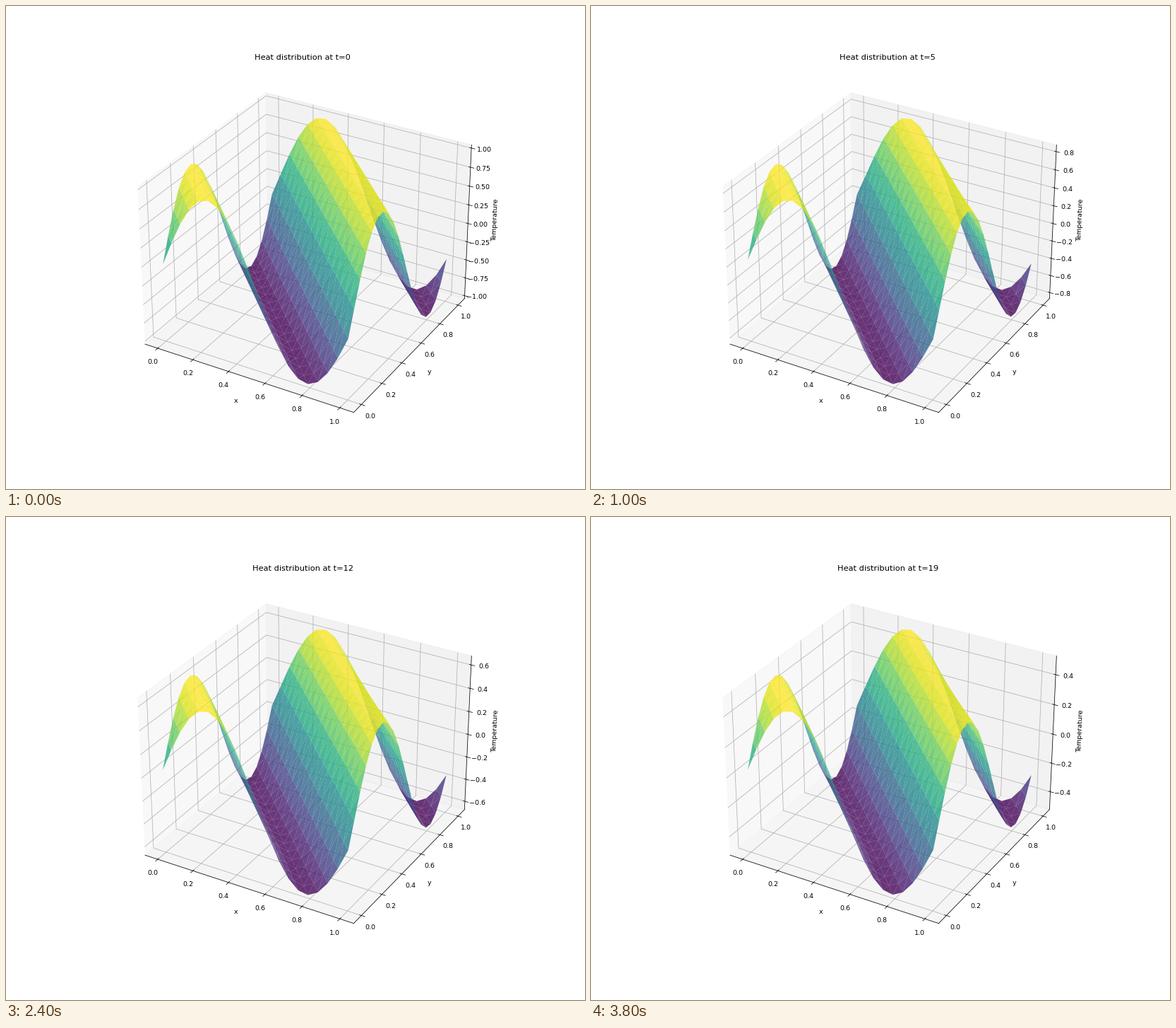
Recreate the animation shown at these times as a matplotlib script. Size 820 by 683 pixels, loop 4 s.

```python
import matplotlib.pyplot as plt
import numpy as np
from matplotlib.animation import FuncAnimation

W, H, DPI = 820, 683, 820 / 12
N, STEPS = 20, 20
WAVE = 6.05     # phase gained across one side of the plate
RATE = 0.185    # diffusion number of one time step


def diffuse(u):
    """One explicit heat step on a plate with wrapped edges."""
    around = sum(np.roll(u, d, axis) for axis in (0, 1) for d in (-1, 1))
    return u + RATE * (around - 4 * u)


def grid_triangles(n):
    """Split each grid cell along its falling diagonal."""
    a = (np.arange(n - 1)[:, None] * n + np.arange(n - 1)).ravel()
    lower = np.column_stack([a, a + 1, a + n])
    upper = np.column_stack([a + 1, a + n + 1, a + n])
    return np.vstack([lower, upper])


side = np.linspace(0, 1, N)
X, Y = np.meshgrid(side, side)
triangles = grid_triangles(N)

states = [np.sin(WAVE * (X + Y))]
for _ in range(STEPS - 1):
    states.append(diffuse(states[-1]))

# The small surplus keeps the pixel size safe from rounding down.
fig = plt.figure(figsize=((W + 0.01) / DPI, (H + 0.01) / DPI), dpi=DPI)
ax = fig.add_subplot(projection="3d")


def update(t):
    ax.clear()
    ax.plot_trisurf(X.ravel(), Y.ravel(), states[t].ravel(),
                    triangles=triangles, cmap="viridis", alpha=0.8)
    ax.set_title(f"Heat distribution at t={t}")
    ax.set_xlabel("x")
    ax.set_ylabel("y")
    ax.set_zlabel("Temperature")
    return []


anim = FuncAnimation(fig, update, frames=STEPS, interval=200,
                     repeat=True, repeat_delay=0)
plt.show()
```
